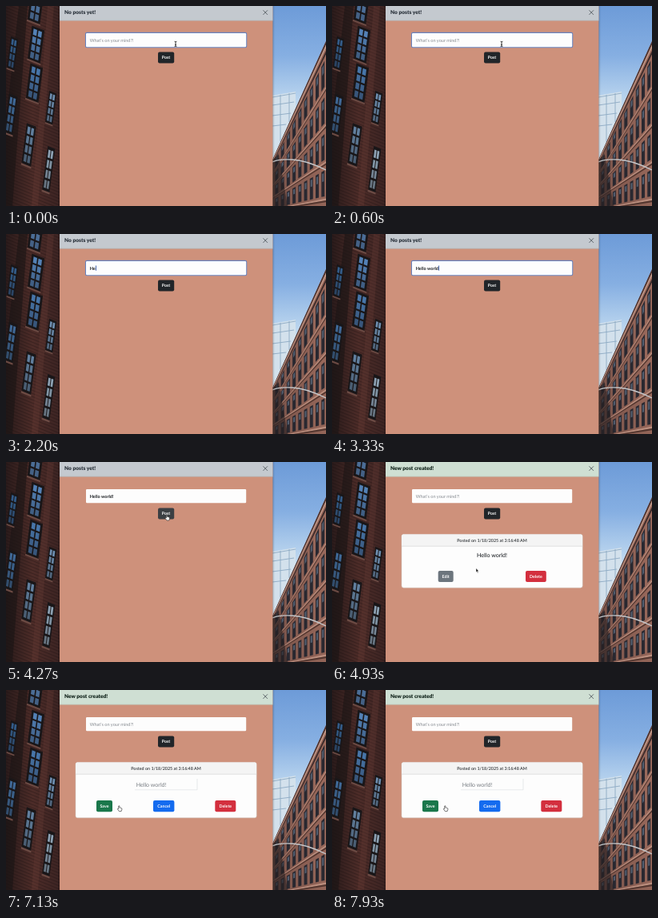
An HTML page for the animation above (8 s loop, 400 px wide and 250 px high).

```html
<!DOCTYPE html>
<html lang="en">
<head>
<meta charset="utf-8">
<title>Posting a note</title>
<style>
  html, body { margin: 0; width: 100%; height: 100%; overflow: hidden; background: #33211f; }
  svg { display: block; width: 400px; height: 250px; }
  text { font-family: Lato, "Open Sans", sans-serif; font-size: 5.6px; white-space: pre; text-rendering: geometricPrecision; }
  .title { font-size: 6.6px; font-weight: 900; }
  .label { font-size: 5.3px; font-weight: 700; fill: #fff; text-anchor: middle; }
  .middle { text-anchor: middle; }
  .typed { font-size: 5.5px; font-weight: 700; }
</style>
</head>
<body>
<svg viewBox="0 0 400 250">
  <defs>
    <linearGradient id="sky" x1="0" y1="0" x2="0" y2="1">
      <stop offset="0" stop-color="#6d9bd8"/>
      <stop offset=".25" stop-color="#86afe2"/>
      <stop offset=".48" stop-color="#bdd7ef"/>
    </linearGradient>
    <linearGradient id="darkBrick">
      <stop offset="0" stop-color="#2a1b1b"/>
      <stop offset=".5" stop-color="#4d2c28"/>
      <stop offset="1" stop-color="#3c2423"/>
    </linearGradient>
    <linearGradient id="sunBrick" x1="0" y1="1" x2="1" y2="0">
      <stop offset="0" stop-color="#5e403a"/>
      <stop offset="1" stop-color="#a37061"/>
    </linearGradient>
    <filter id="shade" x="-10%" width="120%"><feGaussianBlur stdDeviation="1.4"/></filter>
    <clipPath id="leftClip"><path d="M0 0H67V250H0z"/></clipPath>
    <clipPath id="rightClip"><path d="M333 0H400V250H333z"/></clipPath>
  </defs>

  <g id="leftHouse" clip-path="url(#leftClip)">
    <path fill="url(#darkBrick)" d="M0 0H67V250H0z"/>
  </g>
  <g clip-path="url(#rightClip)">
    <path fill="url(#sky)" d="M333 0H400V250H333z"/>
    <path fill="#d3e1ec" d="M333 112L362 107V155L333 195z"/>
    <path fill="none" stroke="#8eabc5" stroke-width=".9" d="M333 114L362 109M333 124L360 120M333 137L356 134M333 150L350 148M343 111V170M354 109V145"/>
    <g id="rightHouse"></g>
    <path fill="none" stroke="#c3c5c8" stroke-width="1.3" d="M333 195Q340 191 358 192T400 205"/>
  </g>

  <path fill="#000" opacity=".45" filter="url(#shade)" d="M67 -6H333.4V256H67z"/>
  <path fill="#ce917b" d="M67 0H333.4V250H67z"/>
  <path id="banner" d="M67 0H333.4V18.4H67z"/>
  <path fill="none" stroke="#000" stroke-opacity=".12" stroke-width=".6" d="M67 18.1H333.4"/>
  <text id="bannerText" class="title" x="73" y="10.2"></text>
  <path fill="none" stroke="#555d63" stroke-width=".9" stroke-linecap="round" d="M321.7 5.6L326.7 10.6M326.7 5.6L321.7 10.6"/>

  <rect id="focusRing" x="99.6" y="33.5" width="201" height="18.2" rx="1.5" fill="none" stroke="#6682bf" stroke-width="1.3"/>
  <rect x="100" y="33.9" width="200.2" height="17.4" rx="1.2" fill="#fdfdfd"/>
  <text id="draft" x="104.7" y="44.6"></text>
  <path id="caret" fill="#3559a8" d="M0 39.4h.9v6.4h-.9z"/>
  <g id="postButton"></g>

  <g id="card">
    <rect id="cardBox" x="87" y="90.4" width="226.2" rx="2.4" fill="#fdfdfd" stroke="#cfc8c5" stroke-width=".5"/>
    <path fill="#f4f4f4" d="M87.2 105.2V92.8q0-2.2 2.2-2.2H310.8q2.2 0 2.2 2.2V105.2z"/>
    <path stroke="#d5d5d5" stroke-width=".7" d="M87 105.2H313.2"/>
    <text class="middle" x="200" y="99.7" style="font-size:5.4px;font-weight:500" fill="#212529">Posted on 1/18/2025 at 3:16:48 AM</text>
    <g id="viewing">
      <text class="middle" x="200" y="119.4" style="font-size:7.1px;font-weight:500" fill="#212529">Hello world!</text>
    </g>
    <g id="editing">
      <path fill="none" stroke="#d9dde0" stroke-width=".6" d="M161 124.8H239V111"/>
      <text x="162.7" y="120.6" style="font-size:7.1px" fill="#777c82">Hello world!</text>
    </g>
  </g>

  <g id="pointer">
    <path id="beam" fill="none" stroke="#222" stroke-width=".9" d="M-1.4 -3.2Q0 -3.2 0 -2.2Q0 -3.2 1.4 -3.2M0 -2.2V2.2M-1.4 3.2Q0 3.2 0 2.2Q0 3.2 1.4 3.2M-.8 .9H.8"/>
    <path id="arrow" fill="#111" stroke="#fff" stroke-width=".5" d="M0 0V5L1.15 4L2 6L2.9 5.6L2.05 3.7H3.6z"/>
    <path id="hand" fill="#fff" stroke="#222" stroke-width=".6" stroke-linejoin="round" d="M-.6 3.9V.4Q0 -.5 .6 .4V2.6L1.3 2.4L1.8 2.8L2.4 2.7L2.8 3.2L3.5 3.4V5L2.8 7H0L-2 4.2Q-1.8 3.2 -.6 3.9z"/>
  </g>
</svg>
<script>
const LOOP = 8000;
const $ = id => document.getElementById(id);

function add(parent, tag, attrs, content = '') {
  const node = document.createElementNS('http://www.w3.org/2000/svg', tag);
  for (const key in attrs) node.setAttribute(key, attrs[key]);
  node.textContent = content;
  parent.append(node);
  return node;
}

function button(parent, x, y, w, color, label) {
  const box = add(parent, 'rect', { x, y, width: w, height: 14.2, rx: 2, fill: color });
  add(parent, 'text', { x: x + w / 2, y: y + 9, class: 'label' }, label);
  return box;
}

// A four-sided patch of a wall; point(u, v) maps wall coordinates to the stage.
function patch(parent, point, u1, v1, u2, v2, fill, opacity = 1) {
  const corners = [point(u1, v1), point(u2, v1), point(u2, v2), point(u1, v2)];
  add(parent, 'path', { d: `M${corners.join('L')}z`, fill, opacity });
}

function sashWindow(x, y, w, h, glass) {
  const house = $('leftHouse');
  const point = (u, v) => [x + u * w - v * h * .13, y + v * h + u * w * .4];
  patch(house, point, -.15, -.05, 1.15, 1.04, '#191618');
  for (let row = 0; row < 4; row++)
    for (let col = 0; col < 2; col++)
      patch(house, point, col * .5 + .06, row * .25 + .025, col * .5 + .43, row * .25 + .22, glass, .95 - row * .1);
  patch(house, point, -.2, 1.04, 1.2, 1.09, '#6b4a43');
}

function drawLeftHouse() {
  const house = $('leftHouse');
  for (let y = -30; y < 250; y += 4)
    add(house, 'path', { d: `M0 ${y}L67 ${y + 27}`, stroke: '#170f10', 'stroke-width': .8, opacity: .4 });
  add(house, 'path', { d: 'M16 0H27L8 250H-12z', fill: '#1a1415', opacity: .6 });
  add(house, 'path', { d: 'M52 0H60L40 250H32z', fill: '#70423a', opacity: .25 });
  [
    [34, -24, 12, 40, '#5c8bc0'], [34, 27, 12, 38, '#5687bf'],
    [32, 74, 12, 40, '#4a7ab0'], [27, 149, 9, 46, '#6585a5'],
    [55, 108, 7, 36, '#7295b8'], [53, 178, 7, 50, '#93aabd'],
    [7, 40, 7, 36, '#35608f'], [5, 112, 8, 44, '#416d9d']
  ].forEach(w => sashWindow(...w));
}

function drawRightHouse() {
  const house = $('rightHouse');
  const point = (u, v) => [335 + 65 * u, 188 - 144 * u + v * (.5 + u)];
  const band = (v, depth, color) => patch(house, point, -.1, v, 1.1, v + depth, color);
  band(0, 400, 'url(#sunBrick)');
  band(0, 3, '#4a312e');
  band(3, 2.5, '#c19a8a');
  band(8, 3, '#3b2a2a');
  const bays = 9, floor = 31;
  for (let v = 14; v < 220; v += floor) {
    for (let bay = 0; bay < bays; bay++) {
      const u = (bay + .2) / bays, right = u + .55 / bays;
      patch(house, point, u, v, right, v + 22, '#292830');
      patch(house, point, u + .015, v + 2, right - .015, v + 9, '#71869c', .6);
    }
    band(v + 24, 1.6, '#b98d7d');
    band(v + 25.6, 1.6, '#53362f');
  }
  add(house, 'path', { d: 'M333 192L341 186L352 250H333z', fill: '#261e20', opacity: .6 });
}

const message = 'Hello world!';
const keyTimes = [1270, 2130, 2290, 2410, 2530, 2660, 2780, 2900, 3020, 3130, 3250, 3470];
const POSTED = 4330, EDITED = 7130;

// time, x, y of the pointer's hot spot
const route = [
  [0, 212, 47.5], [3800, 212, 47.5], [4130, 201, 66], [4400, 201, 66],
  [4930, 180, 132.7], [5400, 152, 157], [5900, 144, 159.2],
  [6350, 144, 159.2], [6800, 141.3, 144.6], [LOOP, 141.3, 144.6]
];

function pointerAt(t) {
  const i = Math.max(1, route.findIndex(step => step[0] >= t));
  const [t0, x0, y0] = route[i - 1], [t1, x1, y1] = route[i];
  const p = (t - t0) / (t1 - t0), e = p * p * (3 - 2 * p);
  return [x0 + (x1 - x0) * e, y0 + (y1 - y0) * e];
}

const show = (id, on) => $(id).setAttribute('display', on ? 'inline' : 'none');
const paint = (node, color) => node.setAttribute('fill', color);

drawLeftHouse();
drawRightHouse();
const post = button($('postButton'), 190, 57.4, 20.2, '#212529', 'Post');
const edit = button($('viewing'), 132.7, 135.9, 19, '#6c757d', 'Edit');
button($('viewing'), 242, 135.9, 25.8, '#d32f3e', 'Delete');
button($('editing'), 113, 138.1, 20, '#1a774b', 'Save');
button($('editing'), 184, 138.1, 26.4, '#146bef', 'Cancel');
button($('editing'), 261.3, 138.1, 26, '#d32f3e', 'Delete');

function render(t) {
  const posted = t >= POSTED, editing = t >= EDITED;
  const typed = posted ? '' : message.slice(0, keyTimes.filter(k => k <= t).length);

  $('bannerText').textContent = posted ? 'New post created!' : 'No posts yet!';
  paint($('bannerText'), posted ? '#11241b' : '#29313a');
  paint($('banner'), posted ? '#cfdfd3' : '#c4c9cf');

  const draft = $('draft');
  draft.textContent = typed || 'What’s on your mind?!';
  paint(draft, typed ? '#1b1e22' : '#858a90');
  draft.classList.toggle('typed', typed !== '');
  const focused = t < 4200;
  const blink = t < 3500 || (t - 3500) % 1000 < 500;
  show('focusRing', focused);
  show('caret', focused && typed && blink);
  if (typed) $('caret').setAttribute('transform', `translate(${104.9 + draft.getComputedTextLength()} 0)`);

  show('card', posted);
  show('viewing', !editing);
  show('editing', editing);
  $('cardBox').setAttribute('height', editing ? 69.4 : 66.8);

  const [x, y] = pointerAt(t);
  const overPost = y > 57 && y < 72;
  const overEdit = t > 6400 && y < 150;
  paint(post, overPost ? '#3b3f43' : '#212529');
  paint(edit, overEdit ? '#5c636a' : '#6c757d');
  $('pointer').setAttribute('transform', `translate(${x} ${y})`);
  show('pointer', t < keyTimes[0] || t >= 3800);
  show('beam', y < 52);
  show('hand', overPost || overEdit);
  show('arrow', y >= 52 && !overPost && !overEdit);
}

const start = performance.now();
function tick(now) {
  render(Math.max(0, now - start) % LOOP);
  requestAnimationFrame(tick);
}
render(0);
requestAnimationFrame(tick);
</script>
</body>
</html>
```
